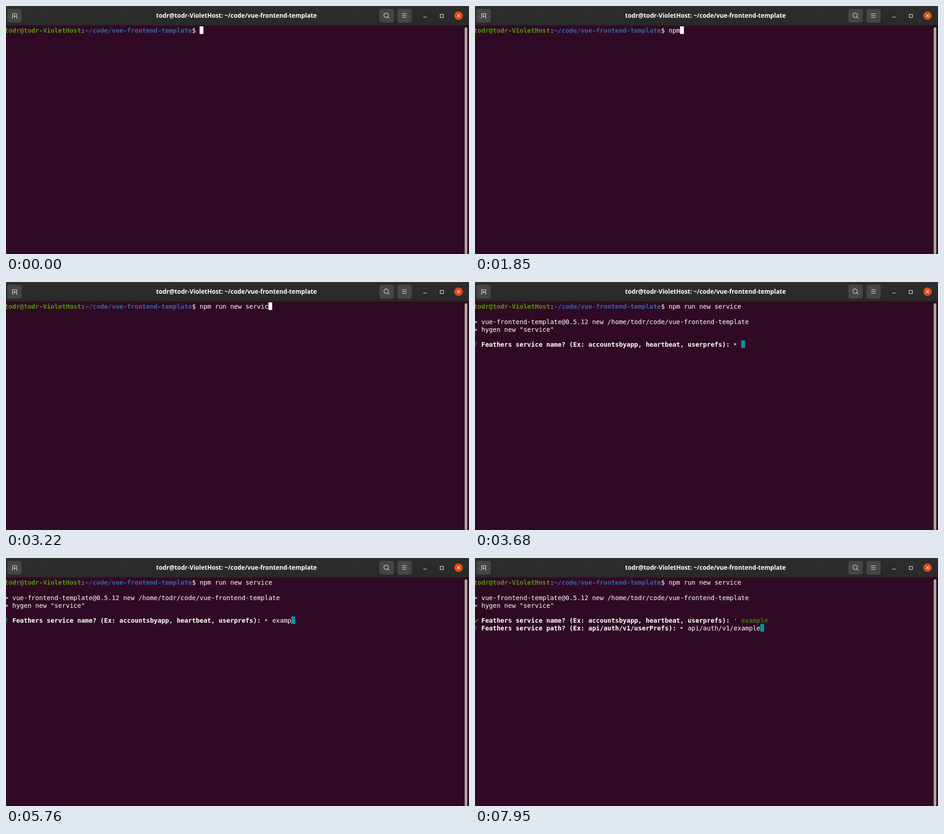
Write an HTML page that moves like this. It is 1021x548 px and loops after 8 s.

```html
<!DOCTYPE html>
<html lang="en">
<head>
<meta charset="utf-8">
<title>Terminal</title>
<style>
  html, body { margin: 0; width: 100%; height: 100%; overflow: hidden; background: #300a24; }
  svg, pre { position: absolute; left: 0; top: 0; }
  pre {
    left: -2.9px; top: 46.2px; margin: 0; color: #fff;
    font: 14px/16.8px "DejaVu Sans Mono", monospace;
  }
  .green { color: #4e9a06; }
  .blue { color: #3465a4; }
  .cyan { color: #06989a; }
  .cell { display: inline-block; width: 1ch; height: 16.8px; vertical-align: top; }
  .hint { position: relative; top: -2px; color: #d3c9d0; }
  .check { position: relative; left: 1px; }
  .check span { font-size: 17px; }
</style>
</head>
<body>
<svg width="1021" height="548" viewBox="0 0 1021 548" fill="none">
  <defs>
    <linearGradient id="bar" x2="0" y2="1">
      <stop stop-color="#2d2d2d"/><stop offset="1" stop-color="#292929"/>
    </linearGradient>
  </defs>
  <rect width="1021" height="43" fill="url(#bar)"/>
  <path d="M0 .5H1021" stroke="#3a3a3a"/>
  <path d="M0 43H1021" stroke="#211a1f"/>
  <g fill="#464646" stroke="#3a3a3a">
    <rect x="3" y="6.5" width="31.5" height="30" rx="4"/>
    <rect x="823.5" y="6.5" width="31.5" height="30" rx="4"/>
    <rect x="863" y="6.5" width="31.5" height="30" rx="4"/>
  </g>
  <g stroke="#f2f2f2" stroke-width="1.1">
    <path d="M12.5 26.5h2v-9.5h9v9.5h2M19 19.5v6M16 22.5h6"/>
    <circle cx="838.3" cy="20.3" r="4.9"/>
    <path d="M841.8 23.8l3.6 3.6M873.5 17h10M873.5 21h10M873.5 25h10M920 24.5h7.5"/>
    <rect x="957.5" y="18.5" width="7" height="7"/>
  </g>
  <circle cx="998" cy="21.4" r="9.5" fill="#df4b16"/>
  <path d="M994.8 18.2l6.4 6.4M1001.2 18.2l-6.4 6.4" stroke="#fff" stroke-width="1.2"/>
  <text x="508.3" y="26" fill="#fff" text-anchor="middle"
        font-family="Open Sans, Noto Sans, sans-serif" font-weight="700" font-size="13.4">todr@todr-VioletHost: ~/code/vue-frontend-template</text>
  <rect x="1011.5" y="47" width="5.7" height="501" rx="2.8" fill="#b0a9a5"/>
  <rect id="caret" width="8.4" height="16.8"/>
  <g id="pointer">
    <circle id="click" r="11" fill="#ff0" fill-opacity=".47"/>
    <path d="M-2.5 -6.5H2.5M0 -6.5V6.5M-2.5 6.5H2.5" stroke="#fff" stroke-width="3"/>
    <path d="M-2.5 -6.5H2.5M0 -6.5V6.5M-2.5 6.5H2.5" stroke="#111"/>
  </g>
</svg>
<pre id="screen"></pre>
<script>
const LOOP = 8000, COLUMN = 8.428, LINE = 16.8;
const [caret, pointer, click, screen] =
  ['caret', 'pointer', 'click', 'screen'].map(id => document.getElementById(id));

// Each key time reveals one more character; a repeated time reveals several.
const commandKeys = [1590, 1700, 1800, 1900, 2010, 2120, 2330, 2400, 2460, 2530,
  2600, 2670, 2740, 2940, 2940, 3090, 3150, 3220, 3280];
const nameKeys = [5210, 5410, 5510, 5610, 5760, 5890, 5950];
const pathKeys = [...Array(12).fill(6750), 7080, 7280, 7400, 7520, 7620, 7740, 7950];
const OUTPUT = 3480, ASK_NAME = 3680, ASK_PATH = 6150;

const typed = (text, keys, t) => text.slice(0, keys.filter(k => k <= t).length);
const span = (style, text) => `<span class="${style}">${text}</span>`;
const asking = span('cell cyan', '?') + ' ';
const answered = span('cell check green', '<span>✔</span>') + ' ';
const hint = text => ` ${span('cell hint', text)} `;

const prompt = `<b>${span('green', 'todr@todr-VioletHost')}</b>:` +
  `<b>${span('blue', '~/code/vue-frontend-template')}</b>$ `;
const output = `

&gt; vue-frontend-template@0.5.12 new /home/todr/code/vue-frontend-template
&gt; hygen new "service"

`;
const nameQuestion = '<b>Feathers service name? (Ex: accountsbyapp, heartbeat, userprefs):</b>';
const pathQuestion = '<b>Feathers service path? (Ex: api/auth/v1/userPrefs):</b>';

function placeCaret(column, line, color) {
  caret.setAttribute('x', column * COLUMN - 2.9);
  caret.setAttribute('y', 45 + line * LINE);
  caret.setAttribute('fill', color);
}

function drawScreen(t) {
  const command = typed('npm run new service', commandKeys, t);
  const name = typed('example', nameKeys, t);
  const path = typed('api/auth/v1/example', pathKeys, t);
  let html = prompt + command;
  if (t < OUTPUT) placeCaret(51 + command.length, 0, '#fff');
  else {
    html += output;
    if (t < ASK_NAME) placeCaret(0, 5, '#fff');
    else if (t < ASK_PATH) {
      html += asking + nameQuestion + hint('▸') + name;
      placeCaret(70 + name.length, 5, '#06989a');
    } else {
      html += answered + nameQuestion + hint('·') + span('green', name) +
        '\n' + asking + pathQuestion + hint('▸') + path;
      placeCaret(56 + path.length, 6, '#06989a');
    }
  }
  if (screen.lastHtml !== html) screen.innerHTML = screen.lastHtml = html;
}

function drawPointer(t) {
  const [x, y] = t < 270 ? [856, 469] : t < 330 ? [820, 410] : [803.5, 383.5];
  pointer.setAttribute('transform', `translate(${x} ${y})`);
  pointer.style.display = t >= 200 && t < 1590 ? '' : 'none';
  click.style.display = t >= 860 && t < 930 ? '' : 'none';
}

function frame() {
  const t = performance.now() % LOOP;
  drawScreen(t);
  drawPointer(t);
  requestAnimationFrame(frame);
}
frame();
</script>
</body>
</html>
```
